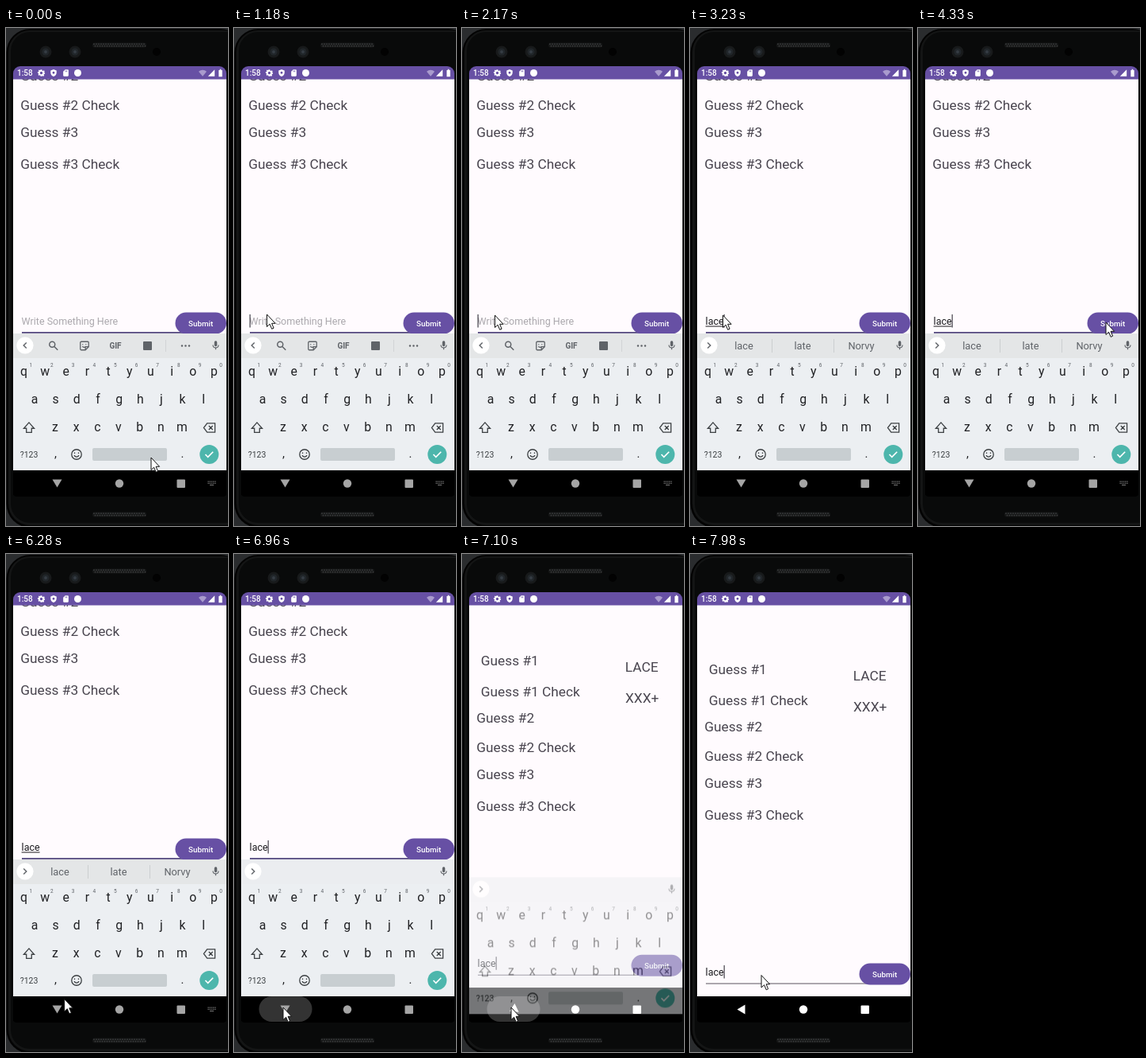
These frames come from a looping animation (280x626 px, 8000 ms). An HTML page with a canvas:

```html
<!DOCTYPE html>
<html lang="en">
<head>
<meta charset="utf-8">
<title>Word guessing app</title>
<style>
html, body { margin: 0; width: 100%; height: 100%; overflow: hidden; background: #0b0c0d; }
canvas { display: block; width: 280px; height: 626px; }
</style>
</head>
<body>
<canvas id="stage"></canvas>
<script>
const W = 280, H = 626, LOOP = 8000, PAN = 157;
const dpr = window.devicePixelRatio || 1;

function surface(canvas) {
  canvas.width = W * dpr;
  canvas.height = H * dpr;
  return canvas.getContext('2d');
}
const stage = surface(document.getElementById('stage'));
const layer = surface(document.createElement('canvas'));
let ctx = stage;

const INK = '#202124', GREY = '#5f6368', PURPLE = '#6750a4';
const clamp = v => Math.max(0, Math.min(1, v));
const span = (t, a, b) => clamp((t - a) / (b - a));
const smooth = p => p * p * (3 - 2 * p);

// time, x, y of the pointer tip
const POINTER = [
  [70, 183, 540], [710, 55, 379], [910, 55, 379], [980, 41.5, 360],
  [1180, 41.5, 360], [1310, 41.5, 350], [1400, 41.5, 362], [1510, 41.5, 361],
  [3720, 41.5, 361], [4330, 237, 370], [5600, 237, 370], [5660, 194.5, 409.5],
  [6420, 62, 574], [6680, 62, 574], [6750, 62, 570], [7130, 62, 570],
  [7430, 73, 560], [7480, 73, 560], [7950, 90, 529.5]
];
const CARET_ON = [[140, 640], [1180, 1500], [2170, 3780], [4260, 4790],
  [5260, 5820], [6320, 6420], [6680, 7230], [7720, 8000]];
const NAME = 'Norvy';
const TYPING = [
  [2700, 'la', ['la', 'last', 'late']],
  [2960, 'lac', ['lac', 'lack', NAME]],
  [3230, 'lace', ['lace', 'late', NAME]]
];

const ICON = {
  gear: 'M10 2h4l.6 3 2.4 1 2.6-1.7 2.8 2.8L20.7 10l.3 1 2 .5v3l-2.5.8-1 2 1.4 2.6-2.5 2.5-2.7-1.5-2 .9L13 22h-3l-.8-2.5-2-.8-2.7 1.3L2.5 17.500 4 15l-.8-2L1 12V9l2.8-.7 1-2L3.3 4.8 5.6 2.3 8.2 4zM12 8a4 4 0 1 0 0 8 4 4 0 1 0 0-8z',
  shield: 'M12 1L3 5v6c0 5.5 3.8 10.7 9 12 5.2-1.3 9-6.5 9-12V5zM12 8a3.5 3.5 0 1 0 0 7 3.5 3.5 0 1 0 0-7z',
  card: 'M18 2h-8L4 8v12a2 2 0 0 0 2 2h12a2 2 0 0 0 2-2V4a2 2 0 0 0-2-2zM10 5h2v4h-2zM14 5h2v4h-2z',
  wifi: 'M0 8a17 17 0 0 1 24 0L12 22z',
  signal: 'M2 22h20V2z',
  battery: 'M7 4h3V1h4v3h3v19H7z',
  mic: 'M12 14a3 3 0 0 0 3-3V5a3 3 0 0 0-6 0v6a3 3 0 0 0 3 3zm5-3a5 5 0 0 1-10 0H5a7 7 0 0 0 6 6.9V21h2v-3.1A7 7 0 0 0 19 11z',
  search: 'M9 3a6 6 0 1 0 0 12 6 6 0 1 0 0-12zM14 14l7 7',
  sticker: 'M5 3h14a2 2 0 0 1 2 2v9l-7 7H5a2 2 0 0 1-2-2V5a2 2 0 0 1 2-2zM21 14h-7v7M8 8v2M15 8v2M7.5 13q3 4 6.5 1',
  shift: 'M12 3L3 13h4.5v7h9v-7H21z',
  erase: 'M22 4H8L2 12l6 8h14zM11 8.5l7 7M18 8.5l-7 7',
  smile: 'M12 2a10 10 0 1 0 0 20 10 10 0 1 0 0-20zM8 8v2.5M16 8v2.5M7 14q5 6 10 0',
  check: 'M3 12l6 6L21 6'
};
for (const k in ICON) ICON[k] = new Path2D(ICON[k]);

function icon(name, x, y, size, color, line) {
  ctx.save();
  ctx.translate(x - size / 2, y - size / 2);
  ctx.scale(size / 24, size / 24);
  if (line) {
    ctx.strokeStyle = color;
    ctx.lineWidth = line * 24 / size;
    ctx.stroke(ICON[name]);
  } else {
    ctx.fillStyle = color;
    ctx.fill(ICON[name], 'evenodd');
  }
  ctx.restore();
}

function text(s, x, y, size, color, align = 'left', weight = 400) {
  ctx.font = `${weight} ${size}px Roboto, Arial, sans-serif`;
  ctx.textAlign = align;
  ctx.fillStyle = color;
  ctx.fillText(s, x, y);
  return ctx.measureText(s).width;
}

function rect(x, y, w, h, color, r = 0) {
  ctx.fillStyle = color;
  ctx.beginPath();
  ctx.roundRect(x, y, w, h, r);
  ctx.fill();
}

function dot(x, y, r, color) {
  ctx.fillStyle = color;
  ctx.beginPath();
  ctx.arc(x, y, r, 0, 7);
  ctx.fill();
}

function poly(points, fill, stroke, width = 1) {
  ctx.beginPath();
  points.forEach(p => ctx.lineTo(p[0], p[1]));
  if (fill) {
    ctx.closePath();
    ctx.fillStyle = fill;
    ctx.fill();
  }
  if (stroke) {
    ctx.strokeStyle = stroke;
    ctx.lineWidth = width;
    ctx.stroke();
  }
}

function grille(y) {
  rect(109, y - 2.5, 68, 6, '#161717', 3);
  for (let row = 0; row < 2; row++)
    for (let x = 111; x < 176; x += 3) dot(x + row * 1.5, y - 0.8 + row * 2.5, 0.9, '#3a3c3d');
}

function phone() {
  rect(0, 0, W, H, '#2a2c2e');
  rect(0.5, 1, 300, 627, '#030303', 30);
  rect(3, 3, 300, 622, '#141515', 27);
  rect(6, 5, 300, 617, '#090a0a', 24);
  grille(21);
  grille(611);
  for (const x of [50, 87]) {
    dot(x, 30, 7.5, '#181a1b');
    dot(x, 30, 4.5, '#21262a');
    dot(x, 30, 2, '#343c43');
  }
  dot(190, 30, 5, '#020202');
}

function statusBar() {
  rect(9, 48, 269, 16.5, PURPLE, [9, 9, 0, 0]);
  text('1:58', 14, 60, 10, '#fff', 'left', 500);
  icon('gear', 44.5, 56.5, 10, '#fff');
  icon('shield', 60, 56.5, 10, '#fff');
  icon('card', 75.5, 56.5, 10, '#fff');
  dot(90.5, 56.5, 4.5, '#fff');
  icon('wifi', 248, 56.5, 10, '#a99bcd');
  icon('signal', 259, 56.5, 10, '#fff');
  icon('battery', 270.5, 56.5, 10.5, '#fff');
}

function button(t) {
  rect(213.5, 514.5, 64.5, 27, PURPLE, 13.5);
  const fade = 1 - span(t, 5700, 5960);
  if (t > 4790 && fade > 0) {
    ctx.save();
    ctx.beginPath();
    ctx.roundRect(213.5, 514.5, 64.5, 27, 13.5);
    ctx.clip();
    dot(237, 370 + PAN, 6 + 46 * span(t, 4790, 5060), `rgba(255,255,255,${0.29 * fade})`);
    ctx.restore();
  }
  text('Submit', 245.7, 532.2, 9.8, '#fff', 'center', 500);
}

function app(t, typed, close) {
  const shift = -PAN * (t < 7020 ? 1 : Math.pow(1 - close, 3.8));
  ctx.save();
  ctx.translate(0, shift);
  rect(9, 64, 269, 492, '#fffbfe');
  const label = (s, x, y) => text(s, x, y, 17.3, '#49454f');
  label('Guess #1', 23.8, 151);
  label('Guess #1 Check', 23.8, 189.5);
  [[2, 223, 260], [3, 294, 334]].forEach(([n, a, b]) => {
    label('Guess #' + n, 18.2, a);
    label(`Guess #${n} Check`, 18.2, b);
  });
  label('LACE', 205.8, 159);
  label('XXX+', 206, 197.5);

  if (close) rect(20, 539.4, 204, 1, '#5a5560');
  else rect(20, 539, 204, 1.8, '#51467c');
  button(t);
  const x = 19.6;
  let end = x;
  if (typed) {
    end += text(typed, x, 530, 12.5, '#1c1b1f');
    if (t < 6900) rect(x, 531.5, end - x, 1, '#1c1b1f');
  } else {
    text('Write Something Here', x, 530, 12.5, '#aba8ad');
  }
  if (CARET_ON.some(([a, b]) => t >= a && t < b)) rect(end, 517, 1.1, 16.5, '#33303a');
  rect(9, 556, 269, 200, '#000');
  ctx.restore();
}

function toolbar(t, words) {
  const cleared = t >= 6900;
  rect(9, 384, 269, 31, cleared ? '#ebedf0' : '#e4e6e7');
  dot(24, 399, 10.6, '#fff');
  const d = words ? 1 : -1;
  poly([[24 - d * 1.8, 395.5], [24 + d * 1.8, 399], [24 - d * 1.8, 402.5]], null, GREY, 1.4);
  icon('mic', 264.5, 399, 14, GREY);
  if (cleared) return;
  if (words) {
    words.forEach((w, i) => text(w, 68 + 74 * i, 404, 12.8, GREY, 'center'));
    for (const x of [103, 181]) rect(x, 391, 1, 17, '#cbced0');
    return;
  }
  icon('search', 60, 399.5, 14, GREY, 1.5);
  icon('sticker', 99, 399.5, 14, GREY, 1.3);
  text('GIF', 138, 403, 10, GREY, 'center', 700);
  rect(173, 394, 11, 11, GREY, 1);
  rect(201, 392, 1, 15, '#d2d4d6');
  for (const x of [222, 226.5, 231]) dot(x, 399.5, 1.2, GREY);
}

function keyboard(t, words) {
  rect(9, 384, 269, 172, '#eceff2');
  rect(9, 556, 269, 60, '#000');
  toolbar(t, words);
  const keys = (row, x0, y) => [...row].forEach((k, i) =>
    text(k, x0 + 26.65 * i, y, 15.8, INK, 'center'));
  keys('qwertyuiop', 22.5, 437);
  for (let i = 0; i < 10; i++)
    text((i + 1) % 10, 31.3 + 26.65 * i, 426, 6.5, GREY, 'center');
  keys('asdfghjkl', 36, 472);
  keys('zxcvbnm', 62, 506.5);
  icon('shift', 29, 502.5, 17.5, '#3c4043', 1.3);
  icon('erase', 256.5, 502.5, 17, '#3c4043', 1.3);
  text('?123', 29, 539.5, 10.5, '#3c4043', 'center');
  text(',', 62.5, 540, 15, INK, 'center');
  icon('smile', 89, 536, 15, '#3c4043', 1.3);
  rect(109, 528, 94, 16, '#c8ced1', 2);
  text('.', 222.5, 540, 15, INK, 'center');
  dot(256.3, 536, 12, '#4db6ac');
  icon('check', 256.3, 536, 13, '#fff', 1.7);
}

// The closing keyboard fades as one flat layer.
function keyboardLayer(t, words, close) {
  if (close >= 1) return;
  ctx = layer;
  ctx.setTransform(dpr, 0, 0, dpr, 0, 0);
  ctx.clearRect(0, 0, W, H);
  keyboard(t, words);
  ctx = stage;
  ctx.save();
  ctx.globalAlpha = 1 - close;
  ctx.drawImage(layer.canvas, 0, 44 * close, W, H);
  ctx.restore();
}

function navBar(t) {
  const press = span(t, 6680, 6860), fade = 1 - span(t, 7130, 7420);
  if (press > 0 && fade > 0) {
    const w = 67 * smooth(press);
    rect(65 - w / 2, 556, w, 32, `rgba(255,255,255,${0.2 * fade})`, 16);
  }
  const v = Math.round(165 + 90 * span(t, 6980, 7100));
  const tone = `rgb(${v},${v},${v})`;
  ctx.save();
  ctx.translate(64.5, 572.5);
  ctx.rotate(Math.PI / 2 * smooth(span(t, 7010, 7150)));
  poly([[-6, -5], [6, -5], [0, 5]], tone);
  ctx.restore();
  dot(143, 572.5, 5.2, tone);
  rect(215.5, 567.5, 10.5, 10.5, tone, 1);
  const left = 1 - span(t, 6720, 6920);
  if (left > 0) {
    const dim = `rgba(150,150,150,${0.8 * left})`;
    for (let i = 0; i < 5; i++) {
      rect(254.5 + 2.2 * i, 569.5, 1.3, 1.2, dim);
      rect(254.5 + 2.2 * i, 571.7, 1.3, 1.2, dim);
    }
    rect(257, 574, 5, 1.1, dim);
  }
}

function pointer(t) {
  let i = POINTER.findIndex(p => p[0] > t);
  if (i < 0) i = POINTER.length;
  const a = POINTER[Math.max(0, i - 1)], b = POINTER[Math.min(i, POINTER.length - 1)];
  const p = b[0] > a[0] ? smooth(span(t, a[0], b[0])) : 0;
  ctx.save();
  ctx.translate(a[1] + (b[1] - a[1]) * p, a[2] + (b[2] - a[2]) * p);
  ctx.beginPath();
  [[0, 0], [0, 15.5], [3.6, 12.2], [6.2, 18.3], [8.6, 17.2], [6.1, 11.3], [10.6, 11.3]]
    .forEach(q => ctx.lineTo(q[0], q[1]));
  ctx.closePath();
  ctx.fillStyle = '#fff';
  ctx.fill();
  ctx.strokeStyle = '#111';
  ctx.lineWidth = 1;
  ctx.stroke();
  ctx.restore();
}

function draw(t) {
  const [, typed, words] = TYPING.filter(s => t >= s[0]).pop() || [0, '', null];
  const close = span(t, 7020, 7180);
  ctx.setTransform(dpr, 0, 0, dpr, 0, 0);
  phone();
  ctx.save();
  ctx.beginPath();
  ctx.roundRect(9, 64, 269, 524.5, [0, 0, 4, 4]);
  ctx.clip();
  rect(9, 64, 269, 525, '#000');
  app(t, typed, close);
  keyboardLayer(t, words, close);
  navBar(t);
  ctx.restore();
  statusBar();
  pointer(t);
}

const start = performance.now();
function tick() {
  draw((performance.now() - start) % LOOP);
  requestAnimationFrame(tick);
}
tick();
</script>
</body>
</html>
```
